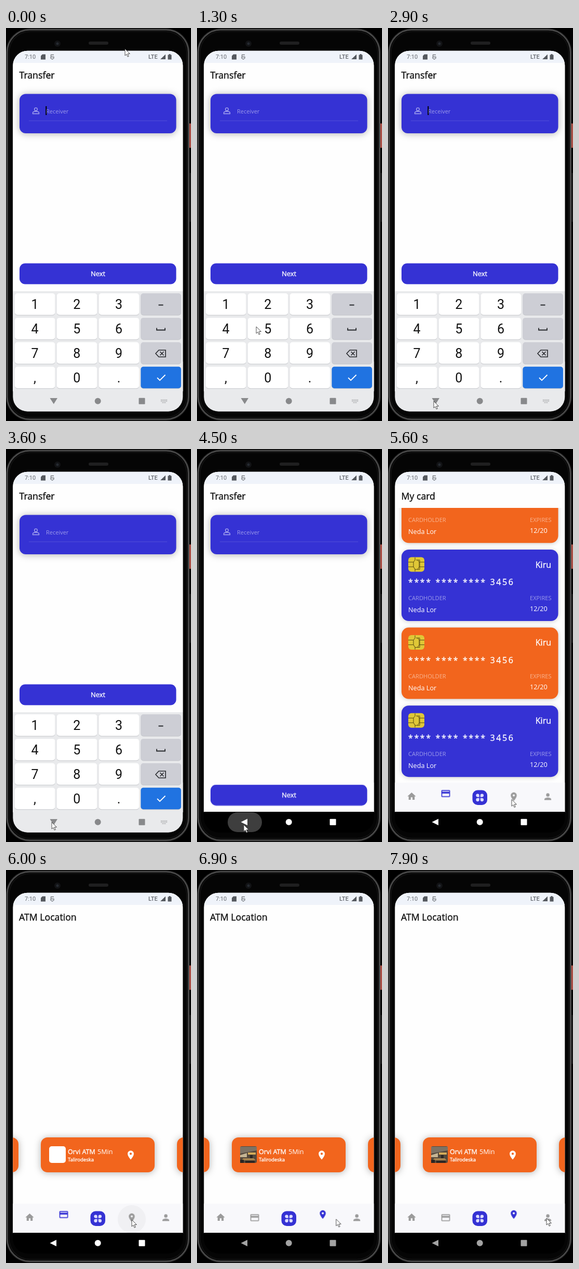
These frames come from a looping animation (356x754 px, 8 s). An HTML page:

```html
<!DOCTYPE html>
<html lang="en">
<head>
<meta charset="utf-8">
<title>Banking app demo</title>
<style>
  html, body { margin: 0; width: 100%; height: 100%; overflow: hidden; background: #000; }
  svg { display: block; width: 356px; height: 754px; }
  text { font-family: "Open Sans", "Noto Sans", sans-serif; fill: #fff; white-space: pre; }
  .title { font-size: 17.7px; fill: #111; stroke: #111; stroke-width: .4px; }
  .bold { stroke: #fff; stroke-width: .35px; }
  .sys { font-family: Roboto, sans-serif; font-size: 11px; fill: #62666c; }
  .key { font-family: Roboto, sans-serif; font-size: 25px; fill: #111; text-anchor: middle; }
  .end { text-anchor: end; }
  .mid { text-anchor: middle; }
  .dim { opacity: .5; }
  .blue { fill: #3532d4; }
  .orange { fill: #f2651d; }
  .soft { filter: drop-shadow(0 1px 4px rgba(0, 0, 0, .2)); }
  .raised { filter: drop-shadow(0 1px 7px rgba(0, 0, 0, .3)); }
  .line { fill: none; stroke-width: 1.3px; }
</style>
</head>
<body>
<svg id="stage" viewBox="0 0 356 754" xmlns="http://www.w3.org/2000/svg"></svg>
<script>
const LOOP = 8000;
const BLUE = '#3532d4', GREY = '#9b9b9b';

const ICONS = {
  home: 'M10 20v-6h4v6h5v-8h3L12 3 2 12h3v8z',
  card: 'M20 4H4c-1.1 0-2 .9-2 2v12c0 1.1.9 2 2 2h16c1.1 0 2-.9 2-2V6c0-1.1-.9-2-2-2zm0 14H4v-6h16zm0-10H4V6h16z',
  pin: 'M12 2C8.1 2 5 5.1 5 9c0 5.3 7 13 7 13s7-7.7 7-13c0-3.9-3.1-7-7-7zm0 9.5a2.5 2.5 0 0 1 0-5 2.5 2.5 0 0 1 0 5z',
  person: 'M12 12a4 4 0 1 0 0-8 4 4 0 0 0 0 8zm0 2c-2.7 0-8 1.3-8 4v2h16v-2c0-2.7-5.3-4-8-4z'
};

const text = (x, y, size, str, cls = '') =>
  `<text x="${x}" y="${y}" class="${cls}"${size ? ` font-size="${size}"` : ''}>${str}</text>`;
const box = (x, y, w, h, r, attrs) =>
  `<rect x="${x}" y="${y}" width="${w}" height="${h}" rx="${r}" ${attrs}/>`;
const icon = (name, cx, cy, scale, attrs = '') =>
  `<path d="${ICONS[name]}" transform="translate(${cx} ${cy}) scale(${scale}) translate(-12 -12)" fill-rule="evenodd" ${attrs}/>`;

function phone() {
  return box(0, 1, 353.5, 752, 46, 'fill="#2b2b2b"')
    + box(2.5, 3.5, 348.5, 747, 43, 'fill="#0a0a0a" stroke="#505050" stroke-width="2"')
    + box(6, 7, 341.5, 740, 40, 'fill="#050505" stroke="#181818"')
    + box(353, 183, 2.5, 47, 1, 'fill="#d4655a"')
    + box(353, 278, 2.5, 94, 1, 'fill="#202020"')
    + box(159, 26, 38, 6, 3, 'fill="#1f1f20"')
    + '<circle cx="99" cy="30" r="6" fill="#121315"/><circle cx="99" cy="30" r="2.5" fill="#262a31"/>';
}

function statusBar() {
  return box(13, 43, 328, 24, 0, 'fill="#eff3fa"')
    + text(36, 59, 0, '7:10', 'sys')
    + '<path d="M70 50.5h6v10h-9v-7z" fill="#55595f"/>'
    + '<path class="line" stroke="#777b81" d="M92 51.5h-5.5v4h5.500v2.500l-3 2-3-2v-2.500"/>'
    + '<text x="274" y="59" class="sys" font-weight="500">LTE</text>'
    + '<path d="M307 50.5v9.5h-10zM311.5 51.5h2v-1.5h3v1.5h2v9h-7z" fill="#55595f"/>';
}

function bankCard(y, color) {
  return `<g transform="translate(26 ${y})">`
    + box(0, 0, 301.5, 137, 14, `class="${color} soft"`)
    + box(13, 14.5, 31, 28, 6, 'fill="#dfc737"')
    + '<path d="M13 24h10l3-4v-5M13 33h10l3 5v4M44 24H34l-3-4M44 33H34l-3 5M23 24v9M34 24v9M28 20h7v18h-9" fill="none" stroke="#57480f" stroke-width="1"/>'
    + text(288, 34.5, 16, 'Kiru', 'end bold')
    + '<text x="13" y="68" font-size="16" letter-spacing="2.6" class="bold">**** **** **** 3456</text>'
    + text(13, 97, 11.1, 'CARDHOLDER', 'dim') + text(288.5, 97, 11.1, 'EXPIRES', 'end dim')
    + text(13, 120, 12.7, 'Neda Lor') + text(247, 118, 12.7, '12/20')
    + '</g>';
}

function cardsPage() {
  const cards = [43.3, 193, 342.6, 492.2].map((y, i) => bankCard(y, i % 2 ? 'blue' : 'orange'));
  return `<g id="cards"><g clip-path="url(#list)">${cards.join('')}</g>${text(25.5, 97, 0, 'My card', 'title')}</g>`;
}

function photo() {
  return box(83, 530, 32, 32, 3, 'fill="#54483c"')
    + '<path d="M83 531h32v7l-32 6z" fill="#7d7264"/><path d="M83 547l13-4v8H83z" fill="#c5b594"/>'
    + '<path d="M98 542h15v4H98z" fill="#d3ab59"/><path d="M89 553h20l4 4H86z" fill="#a5834f"/>'
    + '<path d="M83 556h7v6h-7zM102 547h5v6h-5zM93 558h18v4H93z" fill="#2a2623"/>';
}

function atmPage() {
  const tile = x => box(x, 513, 219, 67, 13, 'class="orange raised"');
  return `<g id="atm">${text(25, 97, 0, 'ATM Location', 'title')}`
    + [-195, 67, 329].map(tile).join('')
    + box(83, 530, 32, 32, 5, 'fill="#fff"') + `<g id="photo">${photo()}</g>`
    + text(119, 544.5, 12.5, 'Orvi ATM', 'bold') + text(176, 544.5, 12.6, '5Min')
    + text(119, 559, 9.5, 'Talirodeska', 'bold')
    + icon('pin', 240, 547, .85, 'fill="#fff"') + '</g>';
}

function tabBar() {
  const petals = [0, 90, 180, 270].map(a =>
    `<path d="M-1-1h-3a3 3 0 1 1 3-3z" transform="rotate(${a}) scale(1.05)"/>`).join('');
  return box(13, 640, 328, 57, 0, 'fill="#f8f8fb"')
    + '<circle id="tabRipple" cx="242" cy="670" r="27" fill="#000"/>'
    + icon('home', 45.5, 666.5, .82, `fill="${GREY}"`)
    + `<g id="cardTab">${icon('card', 111, 667, .84)}</g>`
    + box(162.5, 654.5, 28.5, 28.5, 10, 'class="blue"')
    + `<g transform="translate(176.7 668.8)" fill="#dcdcff">${petals}</g>`
    + `<g id="pinTab">${icon('pin', 242, 667, .82)}</g>`
    + icon('person', 307.5, 667, .82, `fill="${GREY}"`);
}

function transferPage() {
  return '<g id="transfer">' + box(13, 67, 328, 630, 0, 'fill="#fefefe"')
    + text(25.5, 97, 0, 'Transfer', 'title')
    + box(26, 126.5, 301.5, 75.5, 12, 'class="blue raised"')
    + '<g class="line" stroke="#a9a8f0"><circle cx="57.5" cy="156" r="2.8"/><path d="M51.5 164.5v-1.5c0-4 12-4 12 0v1.5z"/></g>'
    + '<path d="M44 178h266" stroke="#fff" stroke-opacity=".15"/>'
    + text(77, 164, 11, 'Receiver', 'dim')
    + box(76.3, 150, 2, 17, 0, 'id="caret" fill="#000"')
    + '<g id="next">' + box(26, 451.5, 301.5, 40, 11, 'class="blue"')
    + text(177, 476, 13, 'Next', 'mid bold') + '</g></g>';
}

const navShapes = back =>
  `<path d="${back}"/><circle cx="176.7" cy="715.7" r="6"/>` + box(255.5, 709.7, 12, 12, 1, '');

function navBar() {
  return box(13, 696, 328, 43, 0, 'fill="#000"')
    + box(59, 697, 66, 38, 19, 'id="backRipple" fill="#3e3e3e"')
    + `<g id="navIcons">${navShapes('M97 709.5v12.5l-12.5-6.2z')}</g>`;
}

function keyboard() {
  const rows = [['1', '2', '3', ''], ['4', '5', '6', ''], ['7', '8', '9', ''], [',', '0', '.', '']];
  const keys = rows.map((row, r) => row.map((label, c) => {
    const x = 17 + c * 80.8, y = 509 + r * 46.9;
    const fill = c < 3 ? '#fff' : r < 3 ? '#cdced5' : '#2073e1';
    return box(x, y + 1, 77.5, 41.5, 5, 'fill="#c3c5c9"') + box(x, y, 77.5, 41.5, 5, `fill="${fill}"`)
      + (label ? text(x + 38.5, y + 30, 0, label, 'key') : '');
  }).join('')).join('');
  return '<g id="keyboard">' + box(13, 505, 328, 234, 0, 'fill="#e9eaec"') + keys
    + '<g fill="none" stroke="#26282c" stroke-width="1.8"><path d="M293.5 531.5h9M290 575.5v4h16v-4"/>'
    + '<path d="M294 618h13v13h-13l-6-6.5zM296.5 621l7 7m0-7l-7 7" stroke-width="1.6"/>'
    + '<path d="M291 671l5 5 10.5-10.5" stroke="#fff"/></g>'
    + `<g fill="#88898b">${navShapes('M84.5 710h14.5l-7.2 11.5z')}</g>`
    + '<path d="M298 713.5h12M298 716h12M300.5 718.8h7" stroke="#a2a3a5" stroke-width="1.6" stroke-dasharray="1.6 1"/></g>';
}

document.getElementById('stage').innerHTML =
  '<defs><clipPath id="screen">' + box(13.3, 43.7, 327, 692, 28, '') + '</clipPath>'
  + '<clipPath id="list">' + box(13, 113, 328, 527, 0, '') + '</clipPath></defs>'
  + phone()
  + '<g clip-path="url(#screen)">' + box(13, 43, 328, 654, 0, 'fill="#fefefe"')
  + cardsPage() + atmPage() + tabBar() + transferPage() + statusBar() + navBar() + keyboard() + '</g>'
  + '<g id="pointer"><path d="M0 0v13l3-2.7 2.2 4.9 2.1-1-2.2-4.7h4.3z" fill="#fff" stroke="#3a3a3a" stroke-width=".9"/></g>';

// Each step is [ms, value, easing to the next step].
function track(id, prop, steps) {
  const all = [[0, steps[0][1]], ...steps, [LOOP, steps[steps.length - 1][1]]];
  const frames = all.map(([ms, value, easing = 'linear']) => ({ offset: ms / LOOP, [prop]: value, easing }));
  document.getElementById(id).animate(frames, { duration: LOOP, iterations: Infinity });
}
const move = (x, y) => `translate(${x}px, ${y}px)`;
const HOLD = 'step-end', EASE = 'ease-in-out';

track('pointer', 'transform', [
  [100, move(229, 40), EASE], [1200, move(114, 573)], [1500, move(114, 573), EASE],
  [2500, move(88, 716)], [3600, move(88, 716)], [3750, move(90, 716), HOLD],
  [4050, move(90, 721)], [4850, move(90, 721), EASE], [5700, move(242, 671)],
  [6500, move(242, 671), EASE], [7400, move(305, 668)]
]);

const blinks = [[0, 1, HOLD]];
for (let ms = 300, on = 0; ms < LOOP; ms += 500, on = 1 - on) blinks.push([ms, on, HOLD]);
track('caret', 'opacity', blinks);

track('keyboard', 'transform', [[3650, move(0, 0), EASE], [3900, move(0, 234)]]);
track('next', 'transform', [[3650, move(0, 0), EASE], [3900, move(0, 192.5)]]);
track('backRipple', 'opacity', [[4280, 0], [4400, 1], [4520, 1], [4680, 0]]);
track('transfer', 'opacity', [[4530, 1], [4680, 0]]);

track('cards', 'opacity', [[0, 1, HOLD], [5950, 0]]);
track('atm', 'opacity', [[0, 0, HOLD], [5950, 1]]);
track('photo', 'opacity', [[0, 0, HOLD], [6250, 1]]);
track('tabRipple', 'opacity', [[5850, 0], [5980, .035], [6100, .035], [6300, 0]]);
track('cardTab', 'transform', [[6030, move(0, -6), EASE], [6280, move(0, 0)]]);
track('cardTab', 'fill', [[6030, BLUE], [6280, GREY]]);
track('pinTab', 'transform', [[6030, move(0, 0), EASE], [6280, move(0, -6)]]);
track('pinTab', 'fill', [[6030, GREY], [6280, BLUE]]);
track('navIcons', 'fill', [[6150, '#fff'], [6300, '#a3a3a3']]);
</script>
</body>
</html>
```
